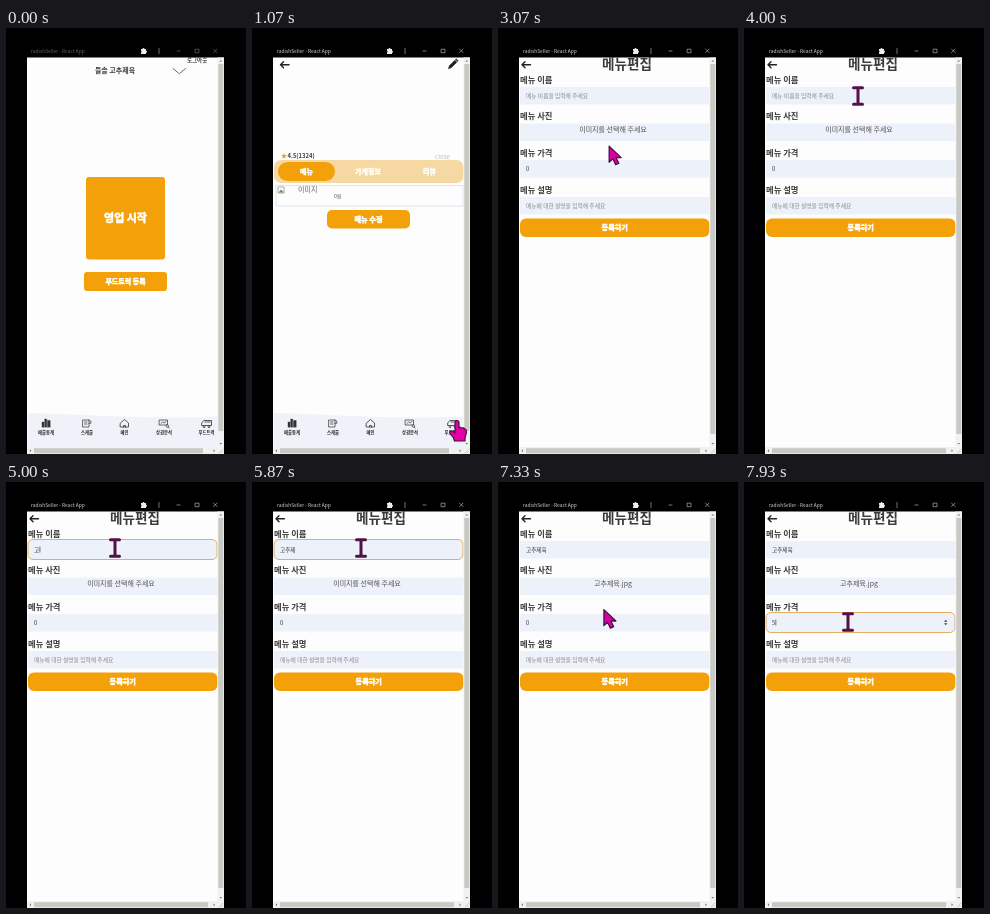
An HTML page with a canvas for the animation above (8 s loop, 240 by 426 pixels).

```html
<!DOCTYPE html>
<html lang="ko">
<head>
<meta charset="utf-8">
<title>Food truck vendor app</title>
<style>
html, body { margin: 0; width: 100%; height: 100%; overflow: hidden; background: #000; }
canvas { display: block; width: 240px; height: 426px; }
</style>
</head>
<body>
<canvas></canvas>
<script>
const canvas = document.querySelector('canvas');
const ctx = canvas.getContext('2d');
const ratio = window.devicePixelRatio || 1;
canvas.width = 240 * ratio;
canvas.height = 426 * ratio;

const LOOP = 8000;
const ORANGE = '#f3a009', INK = '#3b3b3b', FIELD = '#edf1fa';
const STORE = '들솔 고추제육', DISH = '고추제육';

// time, x, y of the pointer's hot spot
const POINTER = [
  [450, 205, 445], [850, 205, 393], [1400, 205, 393], [2000, 107, 191],
  [2650, 107, 191], [3400, 114, 68], [4300, 114, 68], [4700, 109, 66],
  [6100, 109, 66], [6500, 110, 101], [7050, 110, 101], [7500, 104, 140]
];
const TYPING = [
  [0, ''], [4780, 'ㄱ'], [4900, '고'], [5150, '곷'], [5300, '고추'],
  [5550, '고추ㅈ'], [5700, '고추제'], [5950, DISH]
];

// heavy adds an outline in the text colour, for the rounded display lettering
function text(str, x, y, size, { color = INK, weight = 400, align = 'left', heavy = 0 } = {}) {
  ctx.font = `${weight} ${size}px "Noto Sans CJK KR", "Noto Sans CJK", sans-serif`;
  ctx.fillStyle = ctx.strokeStyle = color;
  ctx.textAlign = align;
  ctx.textBaseline = 'middle';
  ctx.fillText(str, x, y);
  if (heavy) {
    ctx.lineWidth = heavy;
    ctx.lineJoin = 'round';
    ctx.strokeText(str, x, y);
  }
}
const centered = (str, x, y, size, options) =>
  text(str, x, y, size, { ...options, align: 'center' });

function box(x, y, w, h, fill, radius = 0, border) {
  ctx.beginPath();
  ctx.roundRect(x, y, w, h, radius);
  if (fill) { ctx.fillStyle = fill; ctx.fill(); }
  if (border) { ctx.strokeStyle = border; ctx.lineWidth = 1; ctx.stroke(); }
}
function shape(d, fill, stroke, width = 1, x = 0, y = 0) {
  const path = new Path2D(d);
  ctx.save();
  ctx.translate(x, y);
  ctx.lineJoin = ctx.lineCap = 'round';
  if (fill) { ctx.fillStyle = fill; ctx.fill(path); }
  if (stroke) { ctx.strokeStyle = stroke; ctx.lineWidth = width; ctx.stroke(path); }
  ctx.restore();
}
function button(label, x, y, w, h, radius, size = 7.2) {
  box(x, y, w, h, ORANGE, radius);
  centered(label, x + w / 2, y + h / 2, size, { color: '#fff', weight: 700, heavy: .6 });
}

function windowFrame(active) {
  box(0, 0, 240, 426, '#000');
  text('radishSeller - React App', 25, 23, 4.9, { color: active ? '#d4d4c8' : '#606068' });
  const tone = active ? '#ccc' : '#777';
  shape('M135 21h1.5a1 1 0 0 1 2 0h1.5v1.7a1 1 0 0 1 0 2v1.3h-5v-1.5a1 1 0 0 0 0-1.8z', '#eee');
  for (const y of [20.5, 22.5, 24.5]) box(152.5, y, 1, 1, '#ddd');
  shape('M171 23h3M189.5 21.2h3.5v3.5h-3.5zM207.5 21l3.6 3.6m0-3.6l-3.6 3.6', null, tone, .6);
  box(21, 29.5, 197, 396.5, '#fdfdfd');
}
function scrollbars(form) {
  box(211.5, 29.5, 6.5, 390, '#f1f1f1');
  box(212.3, 36, 5, form ? 370 : 367, '#c8c8c4');
  box(21, 419, 197, 7, '#f1f1f1');
  box(28, 420.2, form ? 174 : 169, 5, '#c8c8c4');
  shape('M213.4 33.5l1.4-1.6 1.4 1.6zM213.4 415l1.4 1.6 1.4-1.6zM25 421.2l-1.5 1.5 1.5 1.5z'
    + 'M207.5 421.2l1.5 1.5-1.5 1.5z', '#777');
  shape('M217 421l-4 4M217 423.5l-1.5 1.5', null, '#bbb', .7);
}
function backArrow(x) {
  shape('M9 0H.5M3.5-3l-3 3 3 3', null, '#222', 1.4, x, 36.7);
}

function navigation() {
  shape('M21.5 385C70 386 150 392 211.5 388.5V419H21.5z', '#eff2f9');
  shape('M36 399v-5h2v5zM38.7 399v-8h2v8zM41.5 399v-6.5h2.7v6.5z', '#333', '#333', .4);
  shape('M77 392h6v7h-6zM83 392l1.8 1v2.3H83M78.5 394h2.5M78.5 396h2.5', null, '#444', .8);
  shape('M114.5 395l4-3.5 4 3.5v4h-8zM117.5 399v-1.5h2v1.5', null, '#444', .9);
  shape('M153.5 392h8v5h-8zM155 395.5l1.5-1.5 1.5 1 2-1.5M161.3 396.5a1.4 1.4 0 1 0 .1 0zM162 399l1.2 1',
    null, '#444', .8);
  shape('M196 394.5l2-2h7.5v5H196zM199 394h2M202 394h2M198 397.7a1 1 0 1 0 .1 0M203 397.7a1 1 0 1 0 .1 0',
    null, '#444', .9);
  ['매출통계', '스케줄', '메인', '상권분석', '푸드트럭'].forEach((label, i) =>
    centered(label, [40, 81, 118.5, 158, 200.5][i], 404.5, 4.3, { color: '#222', weight: 700 }));
}

function homePage() {
  centered(STORE, 109, 42.5, 7, { weight: 700 });
  shape('M167 40.5l6.3 5.2 6.3-5.2', null, '#8a6250', 1);
  text('로그아웃', 181, 32, 5.5, { weight: 700 });
  button('영업 시작', 80, 149, 79, 82.5, 3, 11);
  button('푸드트럭 등록', 78, 244, 83, 19, 3, 7);
  navigation();
}

function photo() {
  ctx.save();
  ctx.beginPath();
  ctx.rect(27.5, 43.5, 177.5, 79);
  ctx.clip();
  box(27, 43, 179, 80, '#42434a');
  shape('M27 43H206V46L27 72z', '#5d606b');
  shape('M27 43H120L27 57z', '#8b8d96');
  shape('M27 72L206 46V73L27 91z', '#b9b8bc');
  shape('M50 80L126 70M138 65L200 55', null, '#85808a', 7);
  shape('M27 91L206 73V81L27 97z', '#6b4c43');
  shape('M34 100V123M62 97V123M100 94V123M136 90V123M170 86V123M200 83V123', null, '#8b8788', 2.5);
  shape('M27 118L206 112V123H27z', '#5d4742');
  ctx.restore();
}
function star(x, y) {
  shape('M0-2.8L.8-.9 2.8-.8 1.2.5 1.8 2.5 0 1.4-1.8 2.5-1.2.5-2.8-.8-.8-.9z', ORANGE, null, 1, x, y);
}
function tabs(y) {
  box(22, y, 189.5, 23, '#f6d8a2', 7);
  box(26, y + 2, 57, 19, ORANGE, 9.5);
  ['메뉴', '가게정보', '리뷰'].forEach((label, i) =>
    centered(label, [54.5, 116, 177.5][i], y + 11.5, 7, { color: '#fff', weight: 700, heavy: .5 }));
}
function storePage(loaded) {
  backArrow(28);
  shape('M196.5 40.5l.8-2.8 5.5-5.5 2 2-5.5 5.5zM203.5 31.5l.7-.7 2 2-.7.7z', '#222', '#222', .5);
  if (loaded) {
    photo();
    text(STORE, 29, 131, 14.3, { color: ORANGE, weight: 700, heavy: .6 });
    star(32, 144);
    text('4(5)', 36, 144, 5.6, { weight: 700 });
    text('close', 182, 143.5, 6.8, { color: '#aaa' });
    text('고추 제육 구이 & 제육 덮밥 전문 푸드트럭', 29, 150.3, 5.7, { weight: 700 });
    tabs(154);
  } else {
    star(32, 128);
    text('4.5(1324)', 35.5, 128, 5.9, { weight: 700 });
    text('close', 183, 128.5, 6.2, { color: '#bbb' });
    tabs(132);
    box(24, 157.5, 187, 20.5, null, 0, '#dfe3f4');
    box(26, 159, 6, 6, '#fff', 0, '#aaa');
    shape('M26.5 164.5l2.5-3 3 3z', '#5c9b61');
    text('이미지', 46, 161.5, 7, { color: '#666' });
    text('0원', 82, 168.5, 5, { color: '#555' });
  }
  button('메뉴 수정', 75, loaded ? 181 : 182, 83, 18.5, 5);
  navigation();
}

function field(label, y, value, { placeholder, focused, middle, caret } = {}) {
  text(label, 22, y - 7.5, 8.3, { weight: 700 });
  if (focused) box(22, y - 1.5, 189, 20, FIELD, 5, '#e3ad62');
  else box(22, y, 189.5, 17.5, FIELD);
  const cy = y + 8.5;
  if (middle) return centered(value, 115, y + 6, 7, { color: '#555' });
  text(value || placeholder, 28, cy, value ? 5.6 : 5.75,
    value ? { color: '#333', weight: 500 } : { color: '#8a8a8a' });
  if (caret) box(28.5 + (value ? ctx.measureText(value).width : 0), cy - 3, .6, 6, '#222');
}
function formPage(t) {
  const nameFocus = t >= 4450 && t < 6550;
  const priceFocus = t >= 7600;
  const blink = t % 1000 < 500 || t > 7850;
  const name = TYPING.findLast(step => t >= step[0])[1];
  backArrow(23.5);
  centered('메뉴편집', 129, 35.5, 13.6, { weight: 700 });
  field('메뉴 이름', 59, name,
    { placeholder: '메뉴 이름을 입력해 주세요', focused: nameFocus, caret: nameFocus && blink });
  field('메뉴 사진', 95.5, t < 7150 ? '이미지를 선택해 주세요' : DISH + '.jpg', { middle: true });
  field('메뉴 가격', 132, t < 7850 ? '0' : '5', { focused: priceFocus, caret: priceFocus && blink });
  if (priceFocus) shape('M200 139.7l1.7-2 1.7 2zM200 141.2l1.7 2 1.7-2z', '#444');
  field('메뉴 설명', 169, '', { placeholder: '메뉴에 대한 설명을 입력해 주세요' });
  button('등록하기', 22, 190.5, 189.5, 18.5, 6);
}

function pointerAt(t) {
  const next = POINTER.findIndex(key => key[0] > t);
  if (next < 0) return POINTER.at(-1).slice(1);
  if (next === 0) return POINTER[0].slice(1);
  const [t0, x0, y0] = POINTER[next - 1], [t1, x1, y1] = POINTER[next];
  const p = (t - t0) / (t1 - t0), ease = p * p * (3 - 2 * p);
  return [x0 + (x1 - x0) * ease, y0 + (y1 - y0) * ease];
}
function drawPointer(t, form) {
  const [x, y] = pointerAt(t);
  const inside = (top, bottom) => y >= top && y <= bottom;
  const overText = form && (inside(58, 77) || inside(131, 150) || inside(168, 187));
  const overLink = form ? inside(190, 210) : y > 387 || (inside(181, 200) && x > 75 && x < 158);
  if (overText) {
    shape('M-4.5-8.2h9M0-8.2v16.4M-4.5 8.2h9', null, '#541148', 3, x, y);
  } else if (overLink) {
    shape('M-2 1.5C-2-1 2-1 2 1.5V7l1-.8 2 .8 1.5-.2 1.3 1.2 1.2.6.5 3-1.5 5V20H-2.5L-3.5 17-7 12.5'
      + 'C-8 10-5.5 9-4 10.5L-2 12z', '#e500a5', '#48103c', 1.2, x, y);
  } else {
    shape('M0 0V16L3.7 12.6 6.5 18.5 9.7 17 7 11.4H12z', '#d900a7', '#3c1238', 1.2, x, y);
  }
}

function draw(now) {
  const t = now % LOOP;
  const form = t >= 2600;
  ctx.setTransform(ratio, 0, 0, ratio, 0, 0);
  windowFrame(t >= 900);
  if (form) formPage(t);
  else if (t >= 1000) storePage(t >= 1300);
  else homePage();
  scrollbars(form);
  drawPointer(t, form);
}

const start = performance.now();
function tick() {
  draw(performance.now() - start);
  requestAnimationFrame(tick);
}
tick();
</script>
</body>
</html>
```
